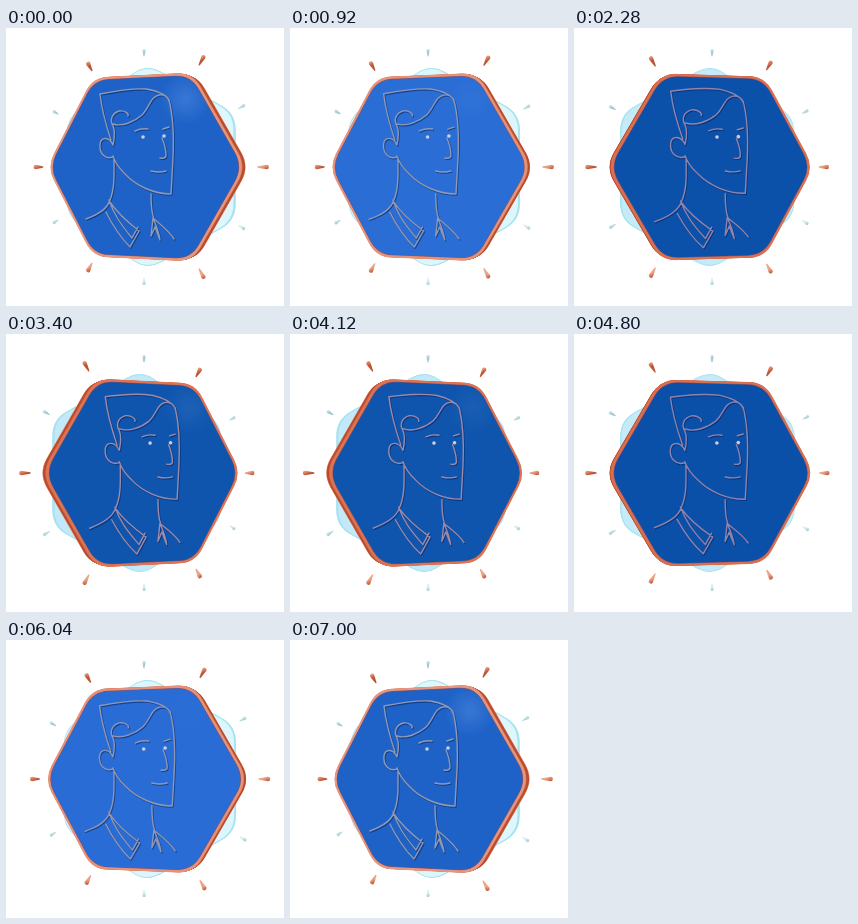
Write an HTML page with a canvas that moves like this. It is 278x278 px and loops after 7.04 s.

```html
<!DOCTYPE html>
<html>
<head>
<meta charset="utf-8">
<title>Swinging badge</title>
<style>
html, body { margin: 0; width: 100%; height: 100%; overflow: hidden; background: #fff; }
canvas { display: block; width: 278px; height: 278px; }
</style>
</head>
<body>
<canvas id="stage"></canvas>
<script>
const LOOP = 7040, CX = 138, CY = 139, DIST = 690, SWING = 20.5 * Math.PI / 180;
const canvas = document.getElementById('stage');
const ctx = canvas.getContext('2d');
const ratio = window.devicePixelRatio || 1;
canvas.width = canvas.height = 278 * ratio;
ctx.scale(ratio, ratio);
ctx.lineCap = ctx.lineJoin = 'round';

let sin = 0, cos = 1;
const turn = angle => { sin = Math.sin(angle); cos = Math.cos(angle); };

// Plane point to screen
function project(x, y, z) {
  const k = DIST / (DIST - x * sin - z * cos);
  return [CX + k * (x * cos - z * sin), CY + k * y];
}

// Screen point back to the plane at depth z
function unproject(sx, sy, z) {
  const u = (sx - CX) / DIST;
  const x = (u * (DIST - z * cos) + z * sin) / (cos + u * sin);
  return [x, (sy - CY) * (DIST - x * sin - z * cos) / DIST];
}

const mapPath = (d, fn) => d.replace(/([\d.-]+) ([\d.-]+)/g, (_, x, y) =>
  fn(+x, +y).map(v => v.toFixed(3)).join(' '));

const polar = (r, deg) => {
  const a = deg * Math.PI / 180;
  return [r * Math.cos(a), r * Math.sin(a)];
};

// Portrait lines as seen at the rightmost turn
const LINE_Z = 10;
const PORTRAIT = [
  'M105 112 C101 100 96 84 94 66 C109 63 124 60 140 61 C152 63 160 67 163 72 C167 88 168 108 167 130 L165 166',
  'M165 166 C148 166 130 158 119 146 C113 140 109 134 107 128',
  'M107 117 C103 108 95 109 94 116 C93 125 99 132 107 129',
  'M107 117 C109 108 109 103 107 98 C103 91 107 85 113 83 C119 82 123 86 122 88',
  'M107 96 C116 99 128 94 136 87 C144 79 144 69 153 67 C158 66 162 69 163 73',
  'M108 130 C108 145 109 160 104 172 C101 182 91 187 80 191',
  'M103 172 C108 186 113 194 126 210 L132 199',
  'M100 184 C107 198 114 209 124 219 L133 203 C124 196 112 186 104 174',
  'M145 166 C145 176 145 184 148 191 C155 197 162 202 168 211',
  'M147 190 L145 208 L149 199 L154 212 C153 204 150 197 147 190',
  'M129 103 Q135 100 142 101', 'M157 101 L163 99',
  'M156 110 C159 117 160 123 160 128 Q159 131 154 130',
  'M145 143 Q153 145 160 143'
].join('');
turn(SWING);
const portrait = mapPath(PORTRAIT, (x, y) => unproject(x, y, LINE_Z));
const eyes = [[137, 109], [158, 108]].map(([x, y]) => unproject(x, y, LINE_Z));

function hexPath(radius, start, z, round = 16) {
  const at = i => polar(radius, start + 60 * i);
  const f = round / radius;
  const near = (a, b) => project(a[0] + (b[0] - a[0]) * f, a[1] + (b[1] - a[1]) * f, z);
  ctx.beginPath();
  for (let i = 0; i < 6; i++) {
    const p = at(i);
    ctx.lineTo(...near(p, at(i - 1)));
    ctx.quadraticCurveTo(...project(...p, z), ...near(p, at(i + 1)));
  }
  ctx.closePath();
}

function fillHex(color, ...shape) {
  hexPath(...shape);
  ctx.fillStyle = color;
  ctx.fill();
}

function ray(deg, inner, outer, size, light, dark) {
  const a = project(...polar(inner, deg), 0), b = project(...polar(outer, deg), 0);
  const dir = Math.atan2(b[1] - a[1], b[0] - a[0]);
  const shade = ctx.createLinearGradient(b[0] - 1, b[1] - size, b[0] + 1, b[1] + size);
  shade.addColorStop(0, light);
  shade.addColorStop(1, dark);
  ctx.beginPath();
  ctx.arc(...a, size * 0.3, dir + Math.PI / 2, dir - Math.PI / 2);
  ctx.arc(...b, size, dir - Math.PI / 2, dir + Math.PI / 2);
  ctx.closePath();
  ctx.fillStyle = shade;
  ctx.fill();
}

// Colour stops run over the swing, from 1 (right) to -1 (left)
function tint(p, stops) {
  let i = 0;
  while (i < stops.length - 2 && p < stops[i + 1][0]) i++;
  const [a, ca] = stops[i], [b, cb] = stops[i + 1];
  const k = (p - a) / (b - a);
  return `rgb(${ca.map((v, j) => Math.round(v + (cb[j] - v) * k))})`;
}

const FACE = [[1, [30, 98, 200]], [0.85, [42, 109, 214]], [-0.6, [11, 80, 168]], [-1, [15, 85, 174]]];
const BACK = [[1, [222, 247, 252]], [-0.6, [197, 235, 250]], [-1, [193, 233, 250]]];
const EDGE = [[1, [231, 150, 125]], [-0.6, [218, 110, 78]], [-1, [222, 116, 84]]];
const WIRE = [[1, [143, 153, 180]], [-0.6, [142, 130, 173]], [-1, [157, 138, 170]]];

function glow(p) {
  const strength = Math.max(0, (Math.abs(p) - 0.8) / 0.2) * (p > 0 ? 0.2 : 0.1);
  if (!strength) return;
  const [x, y] = project(46, -66, 8);
  const g = ctx.createRadialGradient(x, y, 2, x, y, 26);
  g.addColorStop(0, `rgba(150,195,255,${strength})`);
  g.addColorStop(1, 'rgba(150,195,255,0)');
  ctx.fillStyle = g;
  ctx.fill();
}

function drawPortrait(p) {
  const path = new Path2D(mapPath(portrait, (x, y) => project(x, y, LINE_Z)));
  ctx.save();
  ctx.translate(0.8, 1);
  ctx.lineWidth = 1.6;
  ctx.strokeStyle = 'rgba(5,35,95,.55)';
  ctx.stroke(path);
  ctx.restore();
  ctx.lineWidth = 1.4;
  ctx.strokeStyle = tint(p, WIRE);
  ctx.stroke(path);
  ctx.fillStyle = '#c9d0e6';
  for (const e of eyes) {
    ctx.beginPath();
    ctx.arc(...project(...e, LINE_Z), 1.8, 0, 7);
    ctx.fill();
  }
}

function draw(time) {
  const s = 1 - Math.abs(1 - (time % LOOP) / (LOOP / 2));
  const eased = s < 0.5 ? 4 * s ** 3 : 1 - 4 * (1 - s) ** 3;
  const p = 1 - 2 * eased;
  turn(SWING * p);
  ctx.clearRect(0, 0, 278, 278);

  for (let i = 0; i < 6; i++) {
    ray(30 + 60 * i, 111, 116.4, 1.7, '#d3edf0', '#9fc7d0');
    ray(60 * i, 114.5, 122.8, 2.2, '#eda587', '#bd5435');
  }

  const back = tint(p, BACK);
  for (let z = -14; z <= -8; z += 2) fillHex('#a9e3ef', 104, 30, z);
  fillHex(back, 103, 30, -8);

  for (let z = -8; z < 8; z++) fillHex(z < -5 ? '#e58a68' : z < 5 ? '#b84d31' : '#cf6747', 105, 0, z);
  fillHex(tint(p, EDGE), 105, 0, 8);
  fillHex('#8f5361', 102.4, 0, 8);
  fillHex(tint(p, FACE), 101.8, 0, 8);
  glow(p);
  drawPortrait(p);
}

function tick() {
  draw(performance.now());
  requestAnimationFrame(tick);
}
tick();
</script>
</body>
</html>
```
